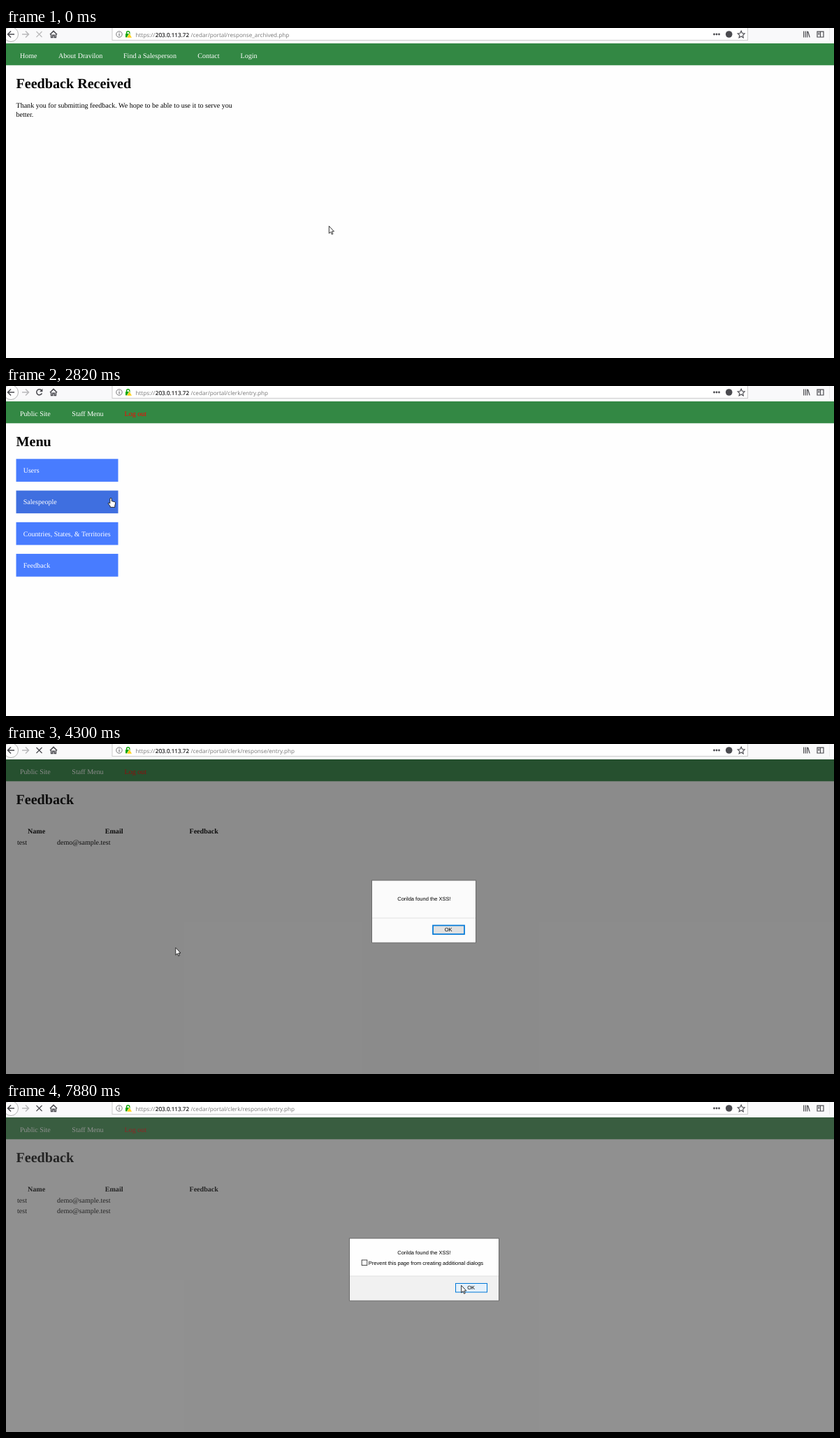
Animation of 1185x472 px, one loop 8 s. Source, as an HTML page:

```html
<!DOCTYPE html>
<html lang="en">
<head>
<meta charset="utf-8">
<title>Feedback walkthrough</title>
<style>
  html, body { margin: 0; width: 100%; height: 100%; overflow: hidden; background: #fefefe; }
  svg { display: block; width: 1185px; height: 472px; }
  text { text-rendering: geometricPrecision; white-space: pre; }
  .serif { font: 10.05px "Liberation Serif", serif; }
  .bold { font-weight: bold; }
  .title { font: bold 20.1px "Liberation Serif", serif; }
  .url { font: 8.15px "Open Sans", sans-serif; fill: #777; }
  .sans { font: 7.5px "Liberation Sans", sans-serif; }
  .icon { fill: none; stroke: #4a4a4f; stroke-width: 1.5; }
  .off { display: none; }
</style>
</head>
<body>
<svg id="stage" viewBox="0 0 1185 472"></svg>
<script>
const LOOP = 8000;

const text = (x, y, s, cls = 'serif', attrs = '') =>
  `<text x="${x}" y="${y}" class="${cls}" ${attrs}>${s}</text>`;
const rect = (x, y, w, h, fill, attrs = '') =>
  `<rect x="${x}" y="${y}" width="${w}" height="${h}" fill="${fill}" ${attrs}/>`;
const line = (d, attrs = '') => `<path class="icon" d="${d}" ${attrs}/>`;
const group = (id, ...parts) => `<g id="${id}">${parts.join('')}</g>`;
const white = 'fill="#fff"';

const toolbar = group('toolbar',
  rect(0, 0, 1185, 22, '#f9f9fa'),
  '<circle cx="7" cy="9" r="10.5" fill="#fdfdfd" stroke="#b5b5b5"/>',
  line('M12 9H2.5M7 4.5L2.5 9L7 13.5'),
  line('M23 9H32.5M28 4.5L32.5 9L28 13.5', 'style="stroke:#b8b8ba"'),
  line('M63 9.2L68 4.4L73 9.2M64.6 9V13.4H66.8V10.2H69.2V13.4H71.4V9'),
  rect(152, -3, 909.5, 20.5, '#fff', 'stroke="#ccc"'),
  '<circle cx="162" cy="9" r="4.2" fill="none" stroke="#6a6a6e" stroke-width=".9"/>',
  line('M162 8.2V11.4M162 6.3V7.3', 'style="stroke-width:1"'),
  line('M172.6 8.5V6.8a2.1 2.1 0 0 1 4.2 0V8.5', 'style="stroke:#12a60d"'),
  rect(171, 8, 7, 5.6, '#12a60d', 'rx=".8"'),
  '<path d="M176.6 7.6L180.4 14H172.8Z" fill="#ffd21a" stroke="#fff" stroke-width=".5"/>',
  text(185.5, 12.5, 'https://', 'url'),
  text(213.8, 12.5, '203.0.113.72', 'url', 'style="fill:#0c0c0d;stroke:#0c0c0d;stroke-width:.15" textLength="50.5"').replace(' textLength="50.5"', ''),
  text(264.5, 12.5, '', 'url', 'id="path"'),
  [1013.5, 1017, 1020.5].map(x => `<circle cx="${x}" cy="9" r="1.4" fill="#4a4a4f"/>`).join(''),
  '<circle cx="1034.7" cy="9" r="4.8" fill="#4a4a4f"/>',
  line('M1052.2 4.2L1053.7 7.5L1057.2 7.9L1054.6 10.3L1055.3 13.8L1052.2 12L1049.1 13.8L1049.8 10.3L1047.2 7.9L1050.7 7.5Z',
    'style="stroke-width:1.1"'),
  line('M1141.7 4.5V13.5M1144.3 4.5V13.5M1146.7 4.5V13.5M1147.7 5L1150.2 13.3', 'style="stroke-width:1.2"'),
  line('M1161 5.2H1170V13H1161ZM1165.5 5V13M1162.3 7.3H1164.3M1162.3 9.2H1164.3', 'style="stroke-width:1.2"'),
  rect(1178, 0, 1, 18, '#ebebec'));

const icons = {
  fading: line('M43.5 5L51.5 13M51.5 5L43.5 13', 'style="stroke:#bbb;stroke-width:1.2"'),
  stop: line('M43.5 5L51.5 13M51.5 5L43.5 13', 'style="stroke-width:1.2"'),
  partial: line('M43.5 5L50.5 12M51 13.2H52', 'style="stroke-width:1.1"'),
  reload: line('M51 6.4A4 4 0 1 0 51.4 10.4') + '<path d="M52.4 3.8V8.2H48Z" fill="#4a4a4f"/>'
};

const publicNav = [[20, 'Home'], [75, 'About Dravilon'], [168, 'Find a Salesperson'], [274.3, 'Contact'], [335.6, 'Login']]
  .map(([x, s]) => text(x, 43, s, 'serif', white)).join('');
const staffNav = text(20, 43, 'Public Site', 'serif', white) + text(94.3, 43, 'Staff Menu', 'serif', white)
  + text(169.5, 43, 'Log out', 'serif', 'fill="#f00"');

const menu = ['Users', 'Salespeople', 'Countries, States, &amp; Territories', 'Feedback'].map((s, i) => {
  const y = 104.3 + i * 45.25;
  return rect(14.5, y, 146, 32.6, '#487cff', 'class="item"') + text(24.7, y + 19.7, s, 'serif', white);
}).join('');

const row = y => text(16, y, 'test') + text(73, y, 'demo@sample.test');

const pages = {
  received: publicNav + text(14.5, 85.6, 'Feedback Received', 'title')
    + text(14.5, 114, 'Thank you for submitting feedback. We hope to be able to use it to serve you')
    + text(14.5, 126.6, 'better.'),
  menu: staffNav + text(14.5, 85.6, 'Menu', 'title') + menu,
  list: staffNav + text(14.5, 85.6, 'Feedback', 'title')
    + text(31, 128.4, 'Name', 'serif bold') + text(141.8, 128.4, 'Email', 'serif bold')
    + text(262.5, 128.4, 'Feedback', 'serif bold') + row(143.6) + group('row2', row(158.7))
};

const okButton = x =>
  rect(x + 1, 259.5, 45, 12.5, '#e1e1e1', 'class="ok" stroke="#0078d7"')
  + text(x + 23.2, 267.8, 'OK', 'sans', 'text-anchor="middle"');

const dialog = (x, w, top, bottom, body) =>
  rect(x, 195, w, 89, top, 'stroke="#6a6a6a"') + rect(x + .5, 249, w - 1, 34.5, bottom)
  + rect(x + .5, 248.5, w - 1, 1, '#e2e2e2') + body;

const message = y => text(598.4, y, 'Corilda found the XSS!', 'sans', 'text-anchor="middle"');

const dialogs = {
  first: dialog(523.5, 149, '#fbfbfb', '#fbfbfb', message(224.4)
    + '<path id="shade" d="M593 259H657V264H663V281H657V283.5H593Z" fill="#f2f2f2"/>' + okButton(610)),
  second: dialog(491.5, 214, '#fefefe', '#f1f1f1', message(218)
    + rect(509.2, 226, 7.6, 7.6, '#fff', 'stroke="#333" stroke-width=".9"')
    + text(518.8, 232.5, 'Prevent this page from creating additional dialogs', 'sans') + okButton(642.5))
};

const pointers = {
  arrow: '<path d="M.3 .3V10.8L2.7 8.6L4.3 12.2L5.9 11.5L4.3 8H7.5Z" fill="#fff" stroke="#111" stroke-width=".85"/>',
  hand: '<path d="M-1.2 .8Q0 -.6 1.2 .8V4.6L5.8 5.8Q6.9 6.3 6.6 8L5.8 11V13.4H-.8V12L-4 7.8Q-3.4 6 -1.2 8Z" fill="#fff" stroke="#111" stroke-width=".85"/>'
};

const layers = set => Object.entries(set).map(([id, body]) => group('g-' + id, body)).join('');

const stage = document.getElementById('stage');
stage.innerHTML = rect(0, 0, 1185, 472, '#fefefe') + rect(0, 22, 1185, 31.3, '#338844')
  + layers(pages) + rect(0, 22, 1185, 450, 'none', 'id="dim"') + toolbar + layers(icons)
  + layers(dialogs) + group('pointer', layers(pointers));

const $ = id => document.getElementById(id);
const items = [...document.querySelectorAll('.item')];
const buttons = [...document.querySelectorAll('.ok')];

// Each track holds [start time, value] steps.
const tracks = {
  page: [[0, 'received'], [2340, 'menu'], [4300, 'list']],
  icon: [[0, 'fading'], [240, 'reload'], [1980, 'stop'], [2700, 'fading'], [2820, 'reload'], [4180, 'partial'], [4300, 'stop']],
  hover: [[0, -1], [2820, 1], [3540, 2], [3660, 3]],
  dialog: [[0, ''], [4300, 'first'], [7020, 'second']],
  dim: [[0, 'none'], [4300, 'rgba(26,26,26,.5)'], [4420, 'rgba(62,62,62,.57)']],
  hot: [[0, false], [5510, true], [7020, false], [7760, true]],
  pointer: [[0, 'arrow'], [970, 'hand'], [1860, 'arrow'], [2820, 'hand'], [3420, 'arrow'], [3540, 'hand'], [4180, 'arrow'] ]
};
const paths = {
  received: '/cedar/portal/response_archived.php',
  menu: '/cedar/portal/clerk/entry.php',
  list: '/cedar/portal/clerk/response/entry.php'
};

// Pointer keys: time, x, y. Motion between keys advances in 120 ms ticks.
const TICK = 120;
const keys = [
  [0, 462, 283], [240, 482, 297], [360, 488, 280], [850, 370, 49], [1220, 311, 46], [1460, 342, 40],
  [1740, 342, 40], [2100, 529.5, 230], [2220, 558, 258], [2580, 179, 165], [2820, 150, 160],
  [3060, 132, 172], [3420, 132, 192], [3780, 143, 258], [3940, 143, 258], [4060, 150, 264],
  [4180, 161.5, 273], [4300, 242.5, 291], [4540, 490, 308], [4780, 596, 293], [5140, 654, 276],
  [5510, 640, 272], [5640, 640, 272], [5760, 639, 270], [6260, 639, 270], [6380, 638.7, 269],
  [6510, 638.7, 269], [6630, 638, 268], [7640, 638, 268], [7760, 645, 265], [7880, 651.3, 262]
];

const at = (track, t) => track.findLast(step => step[0] <= t)[1];

function pointerAt(t) {
  const i = keys.findLastIndex(k => k[0] <= t);
  const [t0, x0, y0] = keys[i];
  const [t1, x1, y1] = keys[i + 1] || [LOOP, x0, y0];
  const p = Math.floor((t - t0) / TICK) * TICK / (t1 - t0);
  return [x0 + (x1 - x0) * p, y0 + (y1 - y0) * p];
}

const show = (set, name) => {
  for (const id in set) $('g-' + id).classList.toggle('off', id !== name);
};

function draw(t) {
  const now = {};
  for (const name in tracks) now[name] = at(tracks[name], t);
  show(pages, now.page);
  show(icons, now.icon);
  show(dialogs, now.dialog);
  show(pointers, now.pointer);
  $('path').textContent = paths[now.page];
  $('dim').setAttribute('fill', now.dim);
  $('row2').classList.toggle('off', t < 7020);
  $('shade').classList.toggle('off', t < 4900);
  items.forEach((el, i) => el.setAttribute('fill', i === now.hover ? '#3f6fe0' : '#487cff'));
  for (const el of buttons) {
    el.setAttribute('fill', now.hot ? '#e5f1fb' : '#e1e1e1');
    el.setAttribute('stroke-width', now.hot ? 1 : 1.7);
  }
  $('pointer').setAttribute('transform', `translate(${pointerAt(t).join(' ')})`);
}

const start = performance.now();
function frame() {
  draw((performance.now() - start) % LOOP);
  requestAnimationFrame(frame);
}
frame();
</script>
</body>
</html>
```
